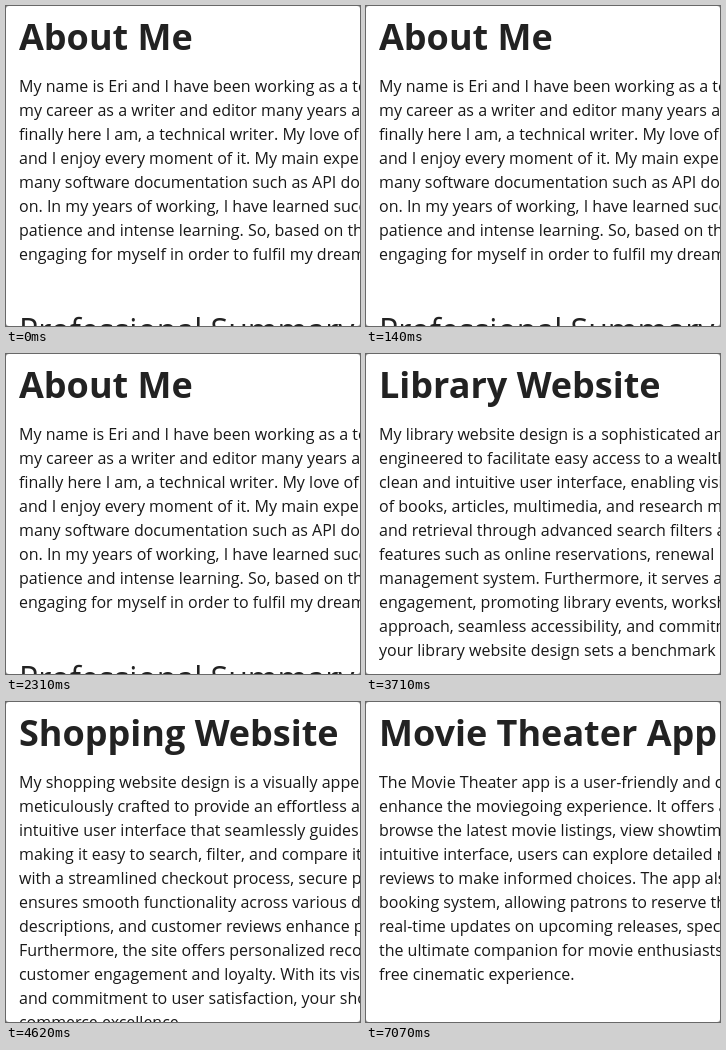
Write an HTML page that moves like this. It is 354x320 px and loops after 8.19 s.

```html
<!DOCTYPE html>
<html lang="en">
<head>
<meta charset="utf-8">
<title>Portfolio texts</title>
<style>
  html, body { margin: 0; width: 100%; height: 100%; overflow: hidden; background: #8a8a8a; }
  #stage { position: absolute; inset: 0; overflow: hidden; background: #fff; border-radius: 3px;
    font: 16px/24px "Open Sans", "Noto Sans", sans-serif; color: #181818; white-space: pre; }
  section { visibility: hidden; }
  h1, h2, p { position: absolute; left: 13px; margin: 0; }
  h1 { top: 6px; font-size: 36px; line-height: 49px; font-weight: 700; color: #222; }
  h2 { top: 302px; font-size: 32px; line-height: 44px; font-weight: 400; color: #222; }
  p { top: 68px; }
</style>
</head>
<body>
<div id="stage">
<section>
<h1>About Me</h1>
<p>My name is Eri and I have been working as a technical writer
my career as a writer and editor many years ago and
finally here I am, a technical writer. My love of writing
and I enjoy every moment of it. My main experience
many software documentation such as API documents
on. In my years of working, I have learned success
patience and intense learning. So, based on this
engaging for myself in order to fulfil my dreams</p>
<h2>Professional Summary</h2>
</section>
<section>
<h1>Library Website</h1>
<p>My library website design is a sophisticated and
engineered to facilitate easy access to a wealth of
clean and intuitive user interface, enabling visitors
of books, articles, multimedia, and research materials
and retrieval through advanced search filters and
features such as online reservations, renewal
management system. Furthermore, it serves as
engagement, promoting library events, workshops
approach, seamless accessibility, and commitment
your library website design sets a benchmark</p>
</section>
<section>
<h1>Shopping Website</h1>
<p>My shopping website design is a visually appealing
meticulously crafted to provide an effortless and
intuitive user interface that seamlessly guides
making it easy to search, filter, and compare items
with a streamlined checkout process, secure payment
ensures smooth functionality across various devices
descriptions, and customer reviews enhance product
Furthermore, the site offers personalized recommendations
customer engagement and loyalty. With its visual
and commitment to user satisfaction, your shopping
commerce excellence.</p>
</section>
<section>
<h1>Movie Theater App</h1>
<p>The Movie Theater app is a user-friendly and convenient
enhance the moviegoing experience. It offers a
browse the latest movie listings, view showtimes
intuitive interface, users can explore detailed movie
reviews to make informed choices. The app also
booking system, allowing patrons to reserve their
real-time updates on upcoming releases, special
the ultimate companion for movie enthusiasts
free cinematic experience.</p>
</section>
</div>
<script>
  const LOOP = 8190;
  const starts = [0, 3710, 4620, 5390];
  const pages = document.querySelectorAll("section");
  const t0 = performance.now();

  function draw(now) {
    const t = Math.max(0, now - t0) % LOOP;
    const current = starts.findLastIndex(s => t >= s);
    pages.forEach((page, i) => {
      page.style.visibility = i === current ? "visible" : "hidden";
    });
    requestAnimationFrame(draw);
  }
  draw(t0);
</script>
</body>
</html>
```
